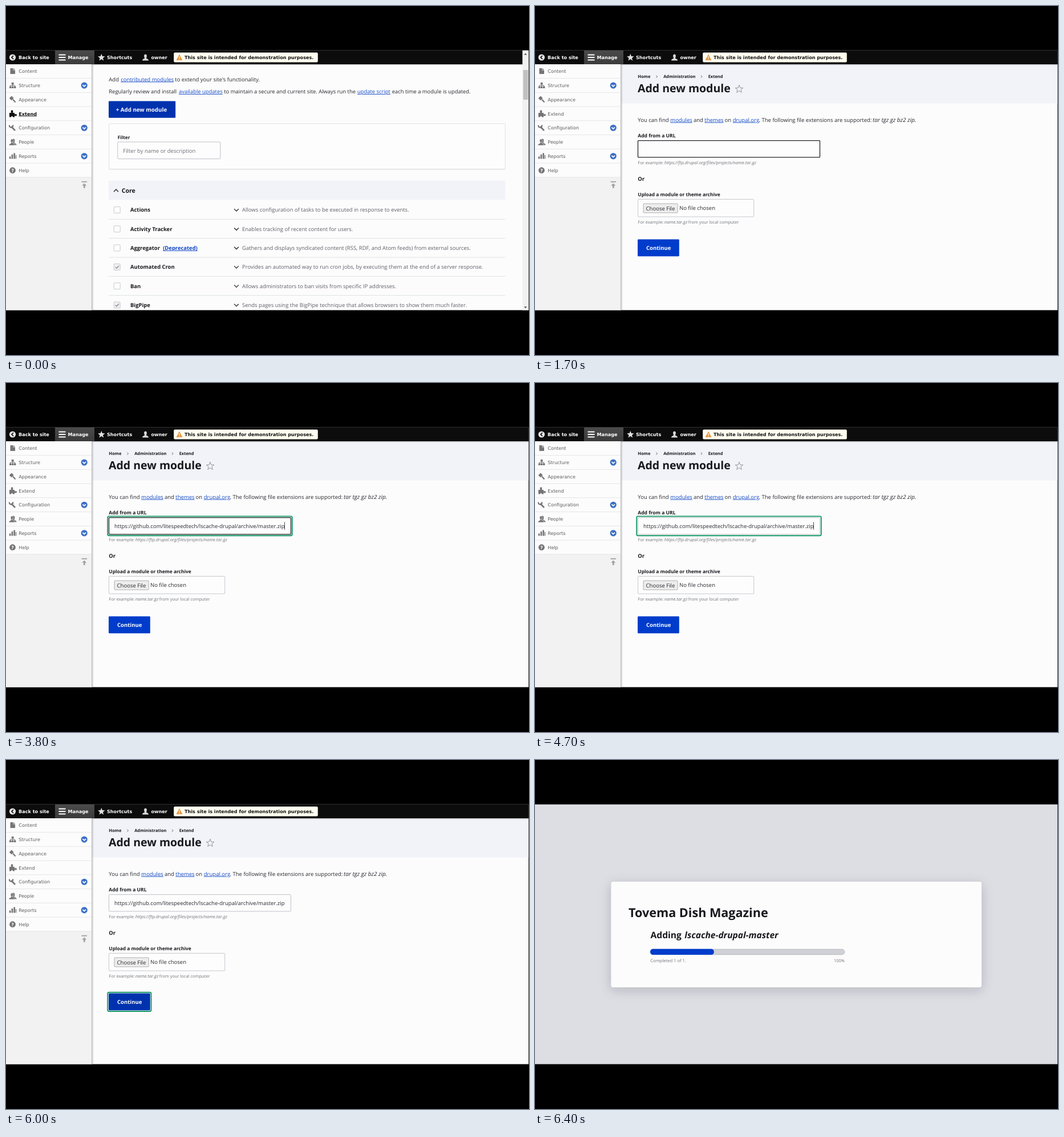
An HTML page that plays this animation: 917 px wide and 611 px high, repeating every 6.6 s.

```html
<!DOCTYPE html>
<html lang="en">
<head>
<meta charset="utf-8">
<title>Adding a module</title>
<style>
html, body { margin: 0; width: 100%; height: 100%; overflow: hidden; background: #000; }
svg { display: block; width: 917px; height: 611px; }
text { font-family: "Open Sans", "Noto Sans", sans-serif; font-size: 9.5px; fill: #2a2b31; white-space: pre; text-rendering: geometricPrecision; }
.bar, .menu { font-family: "DejaVu Sans", Verdana, sans-serif; font-size: 8.1px; }
.bar { font-weight: 700; fill: #fff; }
.menu { fill: #5c5c5c; }
.here { font-weight: 700; fill: #111; text-decoration: underline; }
.b { font-weight: 700; fill: #18191d; }
.i { font-style: italic; }
.a { fill: #1a4fc8; text-decoration: underline; }
.name { font-size: 9.42px; }
.desc { font-size: 9.48px; fill: #60616a; }
.label { font-size: 8.4px; }
.hint { font-size: 7.48px; fill: #74757d; }
.hint .i { font-size: 7.75px; }
.crumb { font-size: 7.45px; }
.btn { font-weight: 700; fill: #fff; }
</style>
</head>
<body>
<svg id="stage" viewBox="0 0 917 611"></svg>
<script>
const LOOP = 6600;
const BLUE = '#003ccb', HOVER = '#0032ae', ACTIVE = '#002c98';
const GREEN = '#169a67', INK = '#232429';

const text = (x, y, s, cls = '', size) =>
  `<text x="${x}" y="${y}" class="${cls}"${size ? ` style="font-size:${size}px"` : ''}>${s}</text>`;
const span = (x, s, cls = '') => `<tspan x="${x}" class="${cls}">${s}</tspan>`;
const rect = (x, y, w, h, fill, more = '') =>
  `<rect x="${x}" y="${y}" width="${w}" height="${h}" fill="${fill}" ${more}/>`;
const box = (x, y, w, h, stroke, more = '') => rect(x, y, w, h, '#fdfdfd', `stroke="${stroke}" ${more}`);
const line = (d, color, width = 1, more = '') =>
  `<path d="${d}" fill="none" stroke="${color}" stroke-width="${width}" ${more}/>`;
const fill = (d, color, more = '') => `<path d="${d}" fill="${color}" ${more}/>`;
const disc = (x, y, r, color) => `<circle cx="${x}" cy="${y}" r="${r}" fill="${color}"/>`;
const group = (id, s) => `<g id="${id}">${s}</g>`;
const chevron = (x, y, w, h, color, width) =>
  line(`M${x - w} ${y - h / 2}L${x} ${y + h / 2}L${x + w} ${y - h / 2}`, color, width);
const ring = (id, x, y, w, h) =>
  group(id, rect(x - 1.8, y - 1.8, w + 3.6, h + 3.6, 'none',
    `rx="2.4" stroke="${GREEN}" stroke-width="1.9"`));
const star = (x, y, r) => {
  let d = '';
  for (let k = 0; k < 10; k++) {
    const a = k * Math.PI / 5, q = k % 2 ? r * 0.42 : r;
    d += (k ? 'L' : 'M') + (x + q * Math.sin(a)).toFixed(2) + ' ' + (y - q * Math.cos(a)).toFixed(2);
  }
  return d + 'Z';
};
const person = (x, y, color) =>
  `<ellipse cx="${x}" cy="${y - 2.4}" rx="2.4" ry="3.2" fill="${color}"/>` +
  fill(`M${x - 5.5} ${y + 5.5}q0-3 3.8-3.6v-2h3.4v2q3.8.6 3.8 3.6z`, color);

function toolbar() {
  return rect(0, 77.5, 916.2, 24.5, '#0c0c0c') + rect(86, 78, 69, 24, 'url(#tab)') +
    disc(11.5, 90, 5.6, '#e6e6e6') + line('M13 87L10 90L13 93', '#0c0c0c', 1.7) +
    text(22, 93, 'Back to site', 'bar') +
    [85.5, 90, 94.5].map(y => line(`M92.5 ${y}H104.5`, '#fff', 2)).join('') +
    text(108.5, 93, 'Manage', 'bar') +
    fill(star(167.3, 90.3, 6.6), '#e2e2e2') + text(177, 93, 'Shortcuts', 'bar') +
    person(244.5, 90, '#d8d8d8') + text(254.5, 93, 'owner', 'bar') +
    rect(294.2, 81.6, 252.6, 16.8, '#fffdf0', 'rx="2"') +
    fill('M304 84.5L309.5 95H298.5Z', '#e29a45') + line('M304 88V91.5M304 92.6V94', '#fff', 1.2) +
    `<text x="313" y="93" class="bar" style="fill:#111">This site is intended for demonstration purposes.</text>`;
}

const puzzle = color => fill('M6 187h3v-1.2a2 2 0 1 1 3 0V187h3v2.6h1.2a1.7 1.7 0 1 1 0 2.6H15v2.3h-3.2v-1a1.5 1.5 0 0 0-2.6 0v1H6z', color);

function sidebar() {
  const g = '#757575';
  const names = ['Content', 'Structure', 'Appearance', '', 'Configuration', 'People', 'Reports', 'Help'];
  let s = rect(0, 102, 150.5, 431, '#f2f2f2') + rect(0, 102, 150.5, 198, '#fcfcfc');
  names.forEach((n, k) => {
    const y = 114.3 + k * 24.75;
    s += line(`M0 ${y + 12.3}H150`, '#e5e5e5', 0.9) + text(22.3, y + 3, n, 'menu');
    if (k === 1 || k === 4 || k === 6) {
      s += disc(137.2, y, 5.6, '#3d70c6') + chevron(137.2, y + 0.4, 2.8, 2.8, '#fff', 1.7);
    }
  });
  s += fill('M7.5 109h5v3.5h3.5V119H7.5z', g) + fill('M13.2 109l2.8 2.8h-2.8z', g);
  s += rect(9.8, 134, 3.8, 3.5, g) + [6, 10, 14].map(x => rect(x, 140.6, 3.4, 3.4, g)).join('') +
    line('M11.7 137v3.5M7.6 141v-2h8v2', g);
  s += fill('M5.8 161.5l4-4 3.8 3.8-4 4z', g) + line('M12 163.5L16.5 168.6', g, 2.2);
  s += line('M9 211L16 218', g, 2.6) + line('M6 208.5q-.5 4.2 3.5 4.2q3.2-.6 2.6-4.4', g, 2.2);
  s += person(13, 238, g) + `<g stroke="#fcfcfc" stroke-width=".5">${person(10.5, 238.5, g)}</g>`;
  s += rect(5.8, 263.5, 2.6, 4, g) + rect(9.6, 260, 2.6, 7.5, g) + rect(13.4, 257.5, 2.6, 10, g) +
    rect(16.8, 261, 1.4, 6.5, g);
  s += disc(11.5, 287.7, 5.4, g) + text(9.3, 290.9, '?', 'bar', 8);
  s += rect(132.5, 306.8, 9.6, 1.8, '#a0a0a0') + fill('M137.3 310.5l4 4h-2.6v4.2h-2.8v-4.2h-2.6z', '#a0a0a0');
  return s + rect(150, 102, 4.5, 431, 'url(#edge)') + line('M150.6 102V533', '#b9b9bb', 1);
}

function listPage() {
  const rows = [
    ['Actions', 'Allows configuration of tasks to be executed in response to events.'],
    ['Activity Tracker', 'Enables tracking of recent content for users.'],
    ['Aggregator', 'Gathers and displays syndicated content (RSS, RDF, and Atom feeds) from external sources.'],
    ['Automated Cron', 'Provides an automated way to run cron jobs, by executing them at the end of a server response.', 1],
    ['Ban', 'Allows administrators to ban visits from specific IP addresses.'],
    ['BigPipe', 'Sends pages using the BigPipe technique that allows browsers to show them much faster.', 1]
  ];
  let s = text(180.3, 131.5, 'Add ' + span(201.3, 'contributed modules', 'a') + span(296.3, "to extend your site's functionality."));
  s += text(180.3, 153, 'Regularly review and install ' + span(303, 'available updates', 'a') +
    span(382.3, 'to maintain a secure and current site.') + span(548.2, 'Always run the') +
    span(616, 'update script', 'a') + span(676.8, 'each time a module is updated.'), '', 9.42);
  s += rect(180, 166.4, 117.2, 29.4, BLUE, 'id="add" rx="1.2"') + text(192.7, 185.2, '+ Add new module', 'btn', 9.75) +
    ring('addRing', 180, 166.4, 117.2, 29.4);
  s += rect(180.5, 207, 695, 80, '#ededf0', 'rx="1.5"') + box(180.5, 206, 694.8, 79.4, '#dfe0e4', 'rx="1.5"');
  s += text(195.8, 232.8, 'Filter', 'b', 8.2) + box(195.8, 238, 180, 29.6, '#bfc1c7', 'rx="1"') +
    `<text x="205.3" y="256.5" style="fill:#6d6e76">Filter by name or description</text>`;
  s += rect(180, 305.8, 695.4, 33.4, '#f2f3f8', 'rx="1"') +
    line('M189 325.2L193 321L197 325.2', INK, 1.3) + text(202.7, 326.8, 'Core', 'b', 10.6);
  rows.forEach(([name, desc, on], k) => {
    const y = 357 + k * 33.3;
    s += rect(189.2, y - 5.5, 11, 11, on ? '#f0f0f2' : '#fdfdfd', 'rx=".8" stroke="#c3c5cb" stroke-width=".9"');
    if (on) s += line(`M191.8 ${y}l2.2 2.3l4-4.6`, '#85868e', 1.3);
    s += text(218, y + 3.4, name, 'b name') + chevron(404, y + 0.2, 3.9, 4, INK, 1.25) + text(414, y + 3.4, desc, 'desc');
    if (k < 5) s += line(`M180 ${y + 16.4}H875.4`, '#dedfe4', 0.9);
  });
  return s + `<text x="275.2" y="427" class="b name a" style="fill:#0f45c6">(Deprecated)</text>`;
}

const scrollbar = () =>
  rect(905.5, 77.5, 10.7, 456, '#f1f1f1') + rect(906.7, 112, 8.6, 52, '#c1c1c1') +
  fill('M908.3 85.5h5l-2.5-3z', '#505050') + fill('M908.3 526.3h5l-2.5 3z', '#505050');

function addPage() {
  let s = rect(151, 102, 765.2, 68.6, '#f2f3f8');
  s += text(180.3, 126, 'Home', 'b crumb') + text(225.2, 126, 'Administration', 'b crumb') + text(303.7, 126, 'Extend', 'b crumb') +
    [213.5, 292].map(x => line(`M${x - 1} 121.6l2 2l-2 2`, '#44454d', 0.9)).join('');
  s += text(180, 151.2, 'Add new module', 'b', 19.5) + line(star(358, 145.6, 7.2), '#8a8b93', 0.9);
  s += text(180.3, 202.6, 'You can find ' + span(237.3, 'modules', 'a') + span(278, 'and') + span(297.3, 'themes', 'a') +
    span(332.5, 'on') + span(346.8, 'drupal.org', 'a') + span(392.5, '. The following file extensions are supported:')) +
    text(592, 202.6, 'tar tgz gz bz2 zip.', 'i', 10);
  s += text(180.3, 230.3, 'Add from a URL', 'b', 8.55) + box(180.5, 235.6, 319, 29.3, '#bfc1c7', 'id="url" rx="1"') +
    ring('urlRing', 180, 235.2, 320, 30.2) +
    group('typed', text(190, 254, 'https://github.com/litespeedtech/lscache-drupal/archive/master.zip')) +
    rect(189.9, 243.4, 0.9, 13.4, '#333', 'id="caret"');
  s += text(180.3, 276.8, 'For example: ' + span(226.8, 'https://ftp.drupal.org/files/projects/name.tar.gz', 'i'), 'hint');
  s += text(180.3, 305.6, 'Or', 'b', 9.4) + text(180.3, 333.4, 'Upload a module or theme archive', 'b label');
  s += box(180.5, 338.4, 203.2, 30.6, '#c6c8cd', 'id="upload" rx="1"') +
    rect(190, 346, 60.2, 16, '#ededed', 'rx="1" stroke="#a0a0a0" stroke-width=".8"') +
    text(194.6, 357.5, 'Choose File') + text(253, 357, 'No file chosen');
  s += text(180.3, 381.2, 'For example: ' + span(226.8, 'name.tar.gz', 'i') + span(268.8, 'from your local computer'), 'hint');
  s += rect(180, 408.6, 72.8, 29.6, BLUE, 'id="go" rx="1.2"') + text(195, 427.2, 'Continue', 'btn', 9.5) +
    ring('goRing', 180, 408.6, 72.8, 29.6);
  return s;
}

function progressPage() {
  return rect(0, 77.5, 916.2, 455.5, '#dddee3') +
    rect(133.5, 213, 649.5, 185, '#fcfcfc', 'rx="4" filter="url(#shade)"') +
    text(164, 274.6, 'Tovema Dish Magazine', 'b', 21.6) +
    text(202.6, 312, 'Adding', 'b', 15.6) + text(262.3, 312, 'lscache-drupal-master', 'b i', 15.5) +
    rect(202.4, 331.3, 340.4, 9.4, '#d0d1d6', 'rx="4.7" stroke="#b4b5ba" stroke-width=".9"') +
    rect(202, 330.8, 8, 10.3, BLUE, 'id="meter" rx="5"') +
    text(202.3, 354.4, 'Completed 1 of 1.', 'hint', 7.6) +
    `<text x="543" y="354.4" class="hint" text-anchor="end">100%</text>`;
}

const stage = document.getElementById('stage');
stage.innerHTML = `<defs>
  <linearGradient id="tab" x2="0" y2="1"><stop stop-color="#4b4b4b"/><stop offset="1" stop-color="#3b3b3b"/></linearGradient>
  <linearGradient id="edge"><stop stop-color="#000" stop-opacity=".2"/><stop offset="1" stop-color="#000" stop-opacity="0"/></linearGradient>
  <linearGradient id="under" x2="0" y2="1"><stop stop-color="#000" stop-opacity=".22"/><stop offset="1" stop-color="#000" stop-opacity="0"/></linearGradient>
  <filter id="shade" x="-10%" y="-30%" width="120%" height="170%"><feDropShadow dx="0" dy="5" stdDeviation="10" flood-color="#222330" flood-opacity=".2"/></filter>
  <clipPath id="view"><rect y="77.5" width="917" height="455.1"/></clipPath></defs>` +
  rect(0, 0, 917, 611, '#000') + '<g clip-path="url(#view)">' +
  group('site', rect(0, 77.5, 916.2, 455.5, '#fcfcfc') + group('list', listPage()) + group('form', addPage()) +
    rect(151, 102, 765.2, 2.5, 'url(#under)') + sidebar() +
    group('extendOn', puzzle('#111') + text(22.3, 191.6, 'Extend', 'menu here')) +
    group('extendOff', puzzle('#757575') + text(22.3, 191.6, 'Extend', 'menu')) +
    toolbar() + group('scroll', scrollbar())) +
  group('progress', progressPage()) + '</g>';

const el = {};
stage.querySelectorAll('[id]').forEach(e => el[e.id] = e);
const show = (id, on) => el[id].setAttribute('display', on ? 'inline' : 'none');
const set = (id, attrs) => { for (const k in attrs) el[id].setAttribute(k, attrs[k]); };
const edge = (id, on, idle) => set(id, { stroke: on ? INK : idle, 'stroke-width': on ? 1.3 : 1 });

function draw(t) {
  const within = (a, b) => t >= a && t < b;
  const list = t < 1100, work = t < 6200;
  show('site', work);
  show('progress', !work);
  ['list', 'extendOn', 'scroll'].forEach(id => show(id, list));
  ['form', 'extendOff'].forEach(id => show(id, !list));

  set('add', { fill: t < 600 ? HOVER : t < 900 ? ACTIVE : BLUE });
  show('addRing', within(600, 900));

  const pasted = t >= 3400;
  edge('url', within(1500, 4300), '#bfc1c7');
  edge('upload', within(4500, 4700), '#c6c8cd');
  show('urlRing', within(2100, 5600));
  show('typed', pasted);
  show('caret', within(2100, 2600) || within(3000, 4100) || within(4500, 4900) || within(5300, 5600));
  set('caret', { x: pasted ? 488 : 189.9 });

  set('go', { fill: t < 4900 ? BLUE : within(5600, 5800) ? ACTIVE : HOVER });
  show('goRing', t >= 5600);
  set('meter', { width: t < 6400 ? 8 : 111.8 });
}

let start;
function tick(now) {
  if (start === undefined) start = now;
  draw((now - start) % LOOP);
  requestAnimationFrame(tick);
}
draw(0);
requestAnimationFrame(tick);
</script>
</body>
</html>
```
